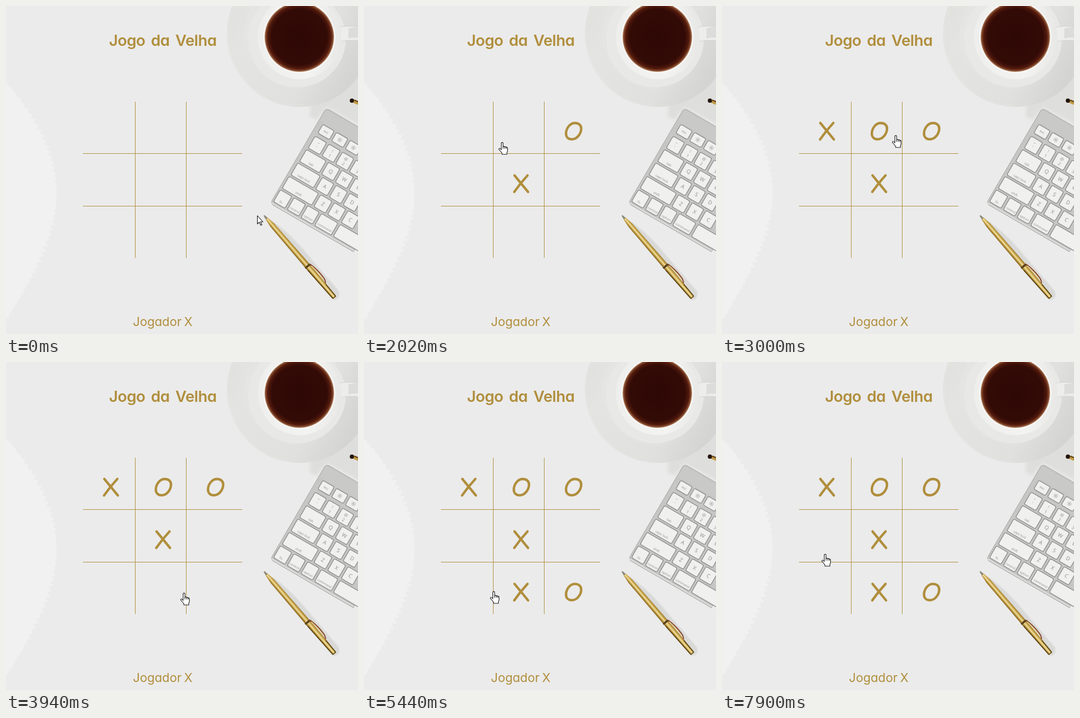
Recreate the animation shown at these times as an HTML page. Size 663 px wide and 617 px high, loop 8 s.

```html
<!DOCTYPE html>
<html lang="pt">
<head>
<meta charset="utf-8">
<title>Jogo da Velha</title>
<style>
  html, body { margin: 0; width: 100%; height: 100%; overflow: hidden; background: #ebebeb; }
  svg { display: block; }
  .gold { fill: #b08e3c; font-family: Inter, "Open Sans", sans-serif; font-feature-settings: "cv11"; }
  .title { font-size: 29px; font-weight: 600; letter-spacing: -.5px; }
  .turn { font-size: 23px; }
  .mark { fill: none; stroke: #b08e3c; stroke-width: 4.6; stroke-linecap: round; }
  .key { fill: #f0f0ef; stroke: #929291; stroke-width: 1.5; }
  .label { fill: #8f8f8f; font-family: "Open Sans", Inter, sans-serif; }
</style>
</head>
<body>
<svg width="663" height="617" viewBox="0 0 663 617">
  <defs>
    <linearGradient id="saucer" x1="0" y1="0" x2="1" y2=".5">
      <stop offset="0" stop-color="#dededb"/><stop offset=".3" stop-color="#e5e5e3"/>
      <stop offset=".75" stop-color="#e1e1df"/><stop offset="1" stop-color="#d4d4d2"/>
    </linearGradient>
    <radialGradient id="coffee">
      <stop offset="0" stop-color="#2d0805"/><stop offset=".8" stop-color="#330b06"/>
      <stop offset=".91" stop-color="#521a0d"/><stop offset=".97" stop-color="#854a2d"/>
      <stop offset="1" stop-color="#c9a88e"/>
    </radialGradient>
    <linearGradient id="cup">
      <stop offset="0" stop-color="#eeeeed"/><stop offset=".6" stop-color="#f3f3f2"/>
      <stop offset="1" stop-color="#e8e8e7"/>
    </linearGradient>
    <linearGradient id="metal" x1="0" y1="0" x2="0" y2="1">
      <stop offset="0" stop-color="#9a7a35"/><stop offset=".25" stop-color="#c6a145"/>
      <stop offset=".52" stop-color="#f2e2a4"/><stop offset=".7" stop-color="#c09a3e"/>
      <stop offset="1" stop-color="#7d5d20"/>
    </linearGradient>
    <filter id="soft"><feGaussianBlur stdDeviation="3"/></filter>
    <filter id="crisp"><feGaussianBlur stdDeviation="1.2"/></filter>
  </defs>

  <rect width="663" height="617" fill="#ebebeb"/>
  <path id="glow" fill="#f1f1f1"/>

  <!-- shade beside the saucer -->
  <g filter="url(#soft)">
    <path d="M620 0H675V228L604 190 585 214 572 208 574 180Z" fill="#dededc"/>
    <path d="M640 0H675V120L630 128 600 170Z" fill="#d1d1cf"/>
  </g>

  <!-- cup -->
  <ellipse cx="553" cy="52" rx="137" ry="138" fill="url(#saucer)"/>
  <g id="rings" fill="none" stroke="#d6d6d3"/>
  <ellipse cx="548" cy="62" rx="92" ry="91" fill="#e8e8e6"/>
  <path d="M626 40Q646 36 668 40V66Q646 62 626 68Z" fill="#ededec" stroke="#d3d3d2"/>
  <path d="M645 42Q660 38 668 41V60Q656 58 645 61Z" fill="#dcdcdb"/>
  <circle cx="553" cy="59" r="78.5" fill="url(#cup)"/>
  <circle cx="552.5" cy="58.5" r="68" fill="#f7f7f6"/>
  <circle cx="552.5" cy="58.5" r="65.5" fill="url(#coffee)"/>

  <!-- small pen end -->
  <path d="M652 178L668 185" stroke="#c09a45" stroke-width="6"/>
  <path d="M656 177L668 182" stroke="#5b3a12" stroke-width="2"/>
  <circle cx="651.5" cy="178" r="4" fill="#21130b"/>

  <!-- keyboard -->
  <g transform="translate(603 192) rotate(30.1)">
    <path d="M7 0H180V208H7Q-1 208 -1 200L0 7Q0 0 7 0Z" fill="#c6c6c5" stroke="#a9a9a8"/>
    <path d="M2 3H180V27H2Z" fill="#c9c9c8"/>
    <path d="M1 206H180" stroke="#e2e2e1" stroke-width="2"/>
    <g id="keys"></g>
  </g>

  <!-- pen -->
  <g transform="translate(486 394) rotate(49.3)">
    <path d="M14 -4Q60 -17 120 -14L200 -14Q214 -7 206 5L110 4Z" fill="#d9d9d8" filter="url(#crisp)"/>
    <path d="M0 -1L9 -2.6V2.6L0 1Z" fill="#8d8877"/>
    <path d="M8 -2.6L24 -4.8 120 -5.6 124 -5.4V5.4L24 4.8 8 2.6Z" fill="url(#metal)"/>
    <path d="M124 -6H128V6H124Z" fill="#5d4319"/>
    <path d="M128 -5.6L202 -4.4Q208 0 202 4.4L128 5.6Z" fill="url(#metal)"/>
    <path d="M126 -6Q145 -10.5 164 -8.5Q171 -7 172 -4" fill="none" stroke="#854325" stroke-width="2"/>
    <path d="M130 -5.5Q148 -8 164 -6" fill="none" stroke="#e7d39a" stroke-width="1.6"/>
    <path d="M132 4.7L203 3.4M174 -3.8L203 -3.2M203 -4V4" stroke="#574014" stroke-width="1.6"/>
  </g>

  <!-- board -->
  <path d="M243.5 180V474M339.5 180V474M145 277.5H445M145 376.5H445" stroke="#b08e3c"/>
  <g id="marks"></g>

  <g class="gold title">
    <text x="194" y="75">Jogo</text><text x="273" y="75">da</text><text x="319" y="75">Velha</text>
  </g>
  <g class="gold turn">
    <text x="239" y="602">Jogador</text><text id="player" x="343.3" y="602" text-anchor="middle">X</text>
  </g>

  <g id="cursor" fill="#fff" stroke="#111" stroke-width="1.1" stroke-linejoin="round">
    <path id="arrow" d="M.5 .5V16L4 12.7 6.7 18.6 9 17.6 6.4 12H11Z"/>
    <g id="hand">
      <path d="M5.6 14.5V2.3a1.7 1.7 0 0 1 3.4 0V8.5q1.8-1 3.2 .4q1.8-.8 2.9 .8q2.3-.4 2.3 2V16q0 2-1.2 3.6V23H7V21q-1-1.6-3-4L1.2 13.8q-.6-1.7 1.2-2q1.4-.1 3.2 2.7Z"/>
      <path d="M9 8.5v4M12.2 9v3.5M15.1 9.8v3" fill="none"/>
    </g>
  </g>
</svg>
<script>
const LOOP = 8000, TICK = 135.8;
const $ = id => document.getElementById(id);

function add(parent, tag, attrs, text) {
  const el = document.createElementNS("http://www.w3.org/2000/svg", tag);
  for (const name in attrs) el.setAttribute(name, attrs[name]);
  if (text) el.textContent = text;
  return parent.appendChild(el);
}

// Light patch on the left with a stepped edge
function drawGlow() {
  const top = 142, height = 448;
  let d = `M0 ${top}`;
  for (let y = 0; y < height; y += 5) {
    const x = 95 * Math.sin(Math.PI * (y / height) ** .9) + 2.5 * Math.sin(y * 1.9);
    d += `H${Math.max(0, x).toFixed(1)}v5`;
  }
  $("glow").setAttribute("d", d + "H0Z");
}

function drawRings() {
  for (let r = 106; r < 134; r += 4)
    add($("rings"), "circle", { cx: 552, cy: 54, r, opacity: r % 8 ? .4 : .7 });
}

function drawKeys() {
  const rows = ["esc,☼,☼,", "~`,!1,@2,#3", "tab,Q,W,E", "caps lock,A,S,D", "shift,Z,X,C", "fn,control,option,command, "];
  const wide = { tab: 43, "caps lock": 49, shift: 64, command: 36, " ": 150 };
  const keys = $("keys");
  rows.forEach((row, i) => {
    const mid = 39 + 30 * i, h = i ? 26 : 19;
    let x = 10 - 1.5 * i;
    for (const name of row.split(",")) {
      const w = wide[name] || 25, long = name.length > 2;
      const label = (text, dy, size) =>
        add(keys, "text", { class: "label", x: x + w / 2, y: mid + dy, "font-size": size, "text-anchor": "middle" }, text);
      add(keys, "rect", { class: "key", x, y: mid - h / 2, width: w, height: h, rx: 3 });
      if (name.length === 1) label(name, 3.5, 10);
      else if (long || name === "fn") label(name, i ? 9 : 2, 6.3);
      else [...name].forEach((c, n) => label(c, n * 10 - 2, 8));
      x += w + 4.8;
    }
  });
}

// Plays: tick and cell; X and O take turns
const plays = [[9, 4], [14, 2], [18, 0], [22, 1], [33, 7], [38, 8]];
const shapes = [
  "M-13 -15.5L12.5 15.5M11.5 -15.5Q-2 -1 -13.5 15.5",
  "M2 -15.4C-8 -15 -14.3 -4 -14.3 4.5C-14.3 11 -10 15.2 -3.5 15.2C7 15.2 14.3 4 14.3 -5C14.3 -12 9 -15.6 2 -15.4Z"
];
const marks = plays.map(([, cell], i) => {
  const x = 198.2 + 98.3 * (cell % 3), y = 235.5 + 98.7 * Math.floor(cell / 3);
  return add($("marks"), "path", { class: "mark", d: shapes[i % 2], transform: `translate(${x} ${y})` });
});

// Cursor key points: tick, left, top
const route = [
  [4, 473, 394], [7, 313, 349], [9, 312, 348], [10, 357, 348], [13, 399, 238], [14, 399, 238],
  [15, 253, 256], [17, 207, 232], [18, 207, 232], [19, 292, 303], [21, 319, 245], [22, 320, 243],
  [24, 338, 350], [27, 324, 433], [31, 332, 434], [32, 300, 434], [33, 300, 434], [35, 373, 435],
  [38, 378, 433], [39, 276, 431], [41, 198, 431], [54, 196, 430], [56, 189, 409], [57, 187, 361]
];

function cursorAt(tick) {
  const next = route.findIndex(p => p[0] > tick);
  if (next === 0) return route[0].slice(1);
  if (next < 0) return route.at(-1).slice(1);
  const [t0, ...from] = route[next - 1], [t1, ...to] = route[next];
  return from.map((v, i) => Math.round(v + (to[i] - v) * (tick - t0) / (t1 - t0)));
}

function show(time) {
  const tick = Math.floor(time / TICK + .25);
  const moved = tick > route[0][0];
  $("cursor").setAttribute("transform", `translate(${cursorAt(tick)})`);
  $("arrow").style.display = moved ? "none" : "";
  $("hand").style.display = moved ? "" : "none";
  const played = plays.filter(([at]) => at <= tick).length;
  marks.forEach((mark, i) => mark.style.display = i < played ? "" : "none");
  $("player").textContent = "XO"[played % 2];
}

drawGlow();
drawRings();
drawKeys();
const began = performance.now();
function frame() {
  show((performance.now() - began) % LOOP);
  requestAnimationFrame(frame);
}
frame();
</script>
</body>
</html>
```
